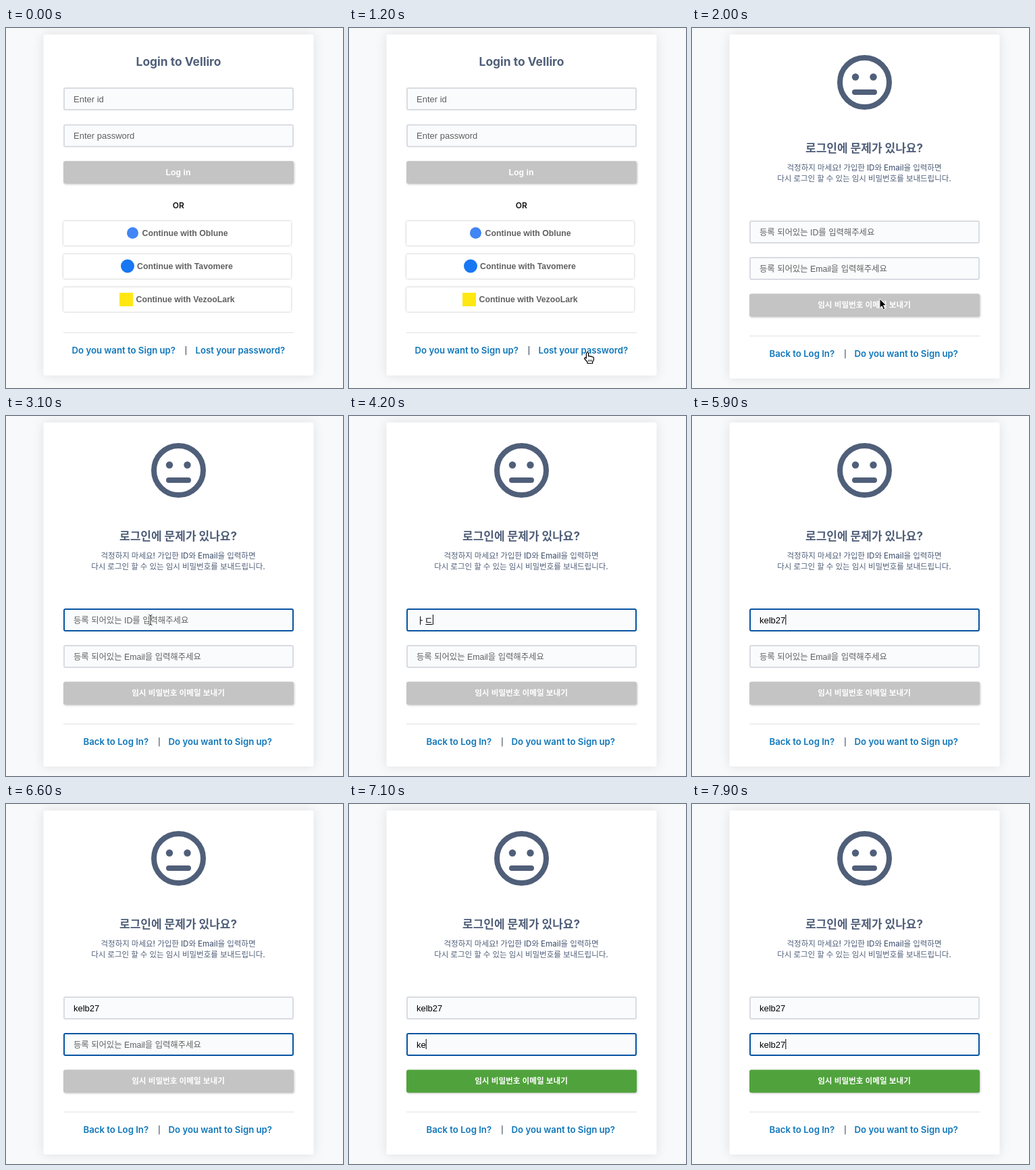
Animation of 499 by 533 pixels, one loop 8 s. Source, as an HTML page:

```html
<!DOCTYPE html>
<html lang="ko">
<head>
<meta charset="utf-8">
<title>Login</title>
<style>
  html, body { margin: 0; width: 100%; height: 100%; overflow: hidden; background: #f8f9fb; }
  svg { display: block; width: 499px; height: 533px; }
  text { font-family: "Liberation Sans", Arial, "Noto Sans CJK KR", sans-serif; white-space: pre; }
  .panel { fill: #fff; filter: drop-shadow(0 0 8px rgba(0, 0, 0, .1)); }
  .title { font: 700 17px Inter, "Noto Sans CJK KR", sans-serif; fill: #505f79; text-anchor: middle; }
  #login .title { font-size: 17.4px; }
  .note { font: 500 11.5px Inter, "Noto Sans CJK KR", sans-serif; fill: #505f79; text-anchor: middle; }
  .link { font: 600 13.2px Inter, sans-serif; fill: #0f76b9; }
  .bar { font: 500 11px Inter, sans-serif; fill: #34405a; text-anchor: middle; }
  .or { font: 600 12px Inter, sans-serif; fill: #111; text-anchor: middle; }
  .field { fill: #fafbfc; stroke: #d8dce2; stroke-width: 2; }
  .field.focus { stroke: #0754a1; }
  .hint { font-size: 13px; fill: #606060; }
  .hint.ko { font-size: 12.35px; }
  .value { font-size: 13px; fill: #000; }
  .button { fill: #c4c4c4; filter: drop-shadow(1px 1px 1.5px rgba(0, 0, 0, .22)); }
  .button.ready { fill: #50a33c; }
  .label { font-size: 12.3px; font-weight: 700; fill: #fff; text-anchor: middle; }
  .label.ko { font-size: 11.6px; }
  .social { fill: #fff; filter: drop-shadow(.7px .7px 1.5px rgba(0, 0, 0, .28)); }
  .social-label { font-size: 12.3px; font-weight: 700; fill: #616161; }
  .rule { stroke: #dcdfe3; }
  .face { fill: none; stroke: #505f79; stroke-width: 8; stroke-linecap: round; }
</style>
</head>
<body>
<svg id="stage" viewBox="0 0 499 533">
  <g id="login"></g>
  <g id="recover"></g>
  <g id="arrow">
    <path d="M0 0V13.5L3.1 10.7L5.3 15.8L7.7 14.8L5.5 9.8H9.7Z" fill="#000" stroke="#fff" stroke-linejoin="round"/>
  </g>
  <g id="hand">
    <path d="M-1.6 8.5V1.4Q-1.6 0 0 0T1.6 1.4V5.6Q3.2 4.4 4.4 6Q6 5 7 6.6Q9.4 6 9.4 8.4V11L7.6 14V16H0V14L-4.4 9Q-4.4 7 -2.6 7.6Z" fill="#fff" stroke="#000" stroke-width="1.2" stroke-linejoin="round"/>
    <path d="M1.8 10.5V13.5M4 10.5V13.5M6.2 10.5V13.5" stroke="#000" fill="none" stroke-width=".9"/>
  </g>
  <g id="beam">
    <path d="M-2.5-7.5Q0-7.5 0-5.5Q0-7.5 2.5-7.5M0-5.5V5.5M-2.5 7.5Q0 7.5 0 5.5Q0 7.5 2.5 7.5" fill="none" stroke="#222"/>
  </g>
</svg>
<script>
const LOOP = 8000, STEP = 100;
const SWITCH = 1600, FOCUS_ID = 2500, FOCUS_EMAIL = 6100;
const $ = id => document.getElementById(id);

function add(parent, tag, attrs, text = '') {
  const el = document.createElementNS('http://www.w3.org/2000/svg', tag);
  for (const key in attrs) el.setAttribute(key, attrs[key]);
  el.textContent = text;
  parent.append(el);
  return el;
}
const write = (g, cls, x, y, text) => add(g, 'text', { class: cls, x, y }, text);
const box = (g, cls, x, y, width, height, rx = 3) =>
  add(g, 'rect', { class: cls, x, y, width, height, rx });
const rule = (g, y) => add(g, 'line', { class: 'rule', x1: 85, x2: 426, y1: y, y2: y });

function field(g, y, hint, cls = 'hint') {
  return {
    y,
    frame: box(g, 'field', 86, y + 1, 339, 32, 2),
    hint: write(g, cls, 100, y + 21.5, hint),
    value: write(g, 'value', 100, y + 21.5, ''),
    line: add(g, 'path', { stroke: '#000', fill: 'none' }),
    caret: add(g, 'path', { stroke: '#000', fill: 'none' })
  };
}

function links(g, y, first, x1, barX, second, x2) {
  write(g, 'link', x1, y, first);
  write(g, 'bar', barX, y - 0.5, '|');
  write(g, 'link', x2, y, second);
}

function buildLogin(g) {
  box(g, 'panel', 55.5, 9.5, 400, 505);
  write(g, 'title', 255.5, 56, 'Login to Velliro');
  field(g, 88, 'Enter id');
  field(g, 142.5, 'Enter password');
  box(g, 'button', 85, 197, 341, 33.5);
  write(g, 'label', 255, 218, 'Log in');
  write(g, 'or', 255.2, 266.5, 'OR');
  const options = [['Oblune', 201.5], ['Tavomere', 194], ['VezooLark', 192.5]];
  options.forEach(([name, x], i) => {
    const y = 286 + i * 49;
    box(g, 'social', 85, y, 337, 36, 2);
    write(g, 'social-label', x, y + 21.5, 'Continue with ' + name);
  });
  add(g, 'circle', { cx: 187.5, cy: 303.5, r: 8.5, fill: '#4285f4' });
  add(g, 'circle', { cx: 180, cy: 352.5, r: 10, fill: '#1877f2' });
  add(g, 'rect', { x: 168, y: 392, width: 20, height: 20, fill: '#ffe812' });
  rule(g, 451);
  links(g, 482, 'Do you want to Sign up?', 97.5, 266.5, 'Lost your password?', 280.5);
}

function buildRecover(g) {
  box(g, 'panel', 55.5, 9.5, 400, 509.5);
  add(g, 'circle', { class: 'face', cx: 255.5, cy: 80.5, r: 36.5 });
  add(g, 'path', { class: 'face', d: 'M241 95H270' });
  for (const cx of [242, 268.5]) add(g, 'circle', { cx, cy: 72.5, r: 5.2, fill: '#505f79' });
  write(g, 'title', 255, 184, '로그인에 문제가 있나요?');
  write(g, 'note', 255, 211, '걱정하지 마세요! 가입한 ID와 Email을 입력하면');
  write(g, 'note', 255, 227, '다시 로그인 할 수 있는 임시 비밀번호를 보내드립니다.');
  const id = field(g, 285, '등록 되어있는 ID를 입력해주세요', 'hint ko');
  const email = field(g, 339, '등록 되어있는 Email을 입력해주세요', 'hint ko');
  const button = box(g, 'button', 85, 393.5, 341, 34);
  write(g, 'label ko', 255, 413.5, '임시 비밀번호 이메일 보내기');
  rule(g, 456);
  links(g, 487, 'Back to Log In?', 114.5, 227, 'Do you want to Sign up?', 240.5);
  return { id, email, button };
}

buildLogin($('login'));
const form = buildRecover($('recover'));

// [time, text]
const idKeys = [
  [FOCUS_ID, ''], [3900, 'ㅏ'], [4100, 'ㅏㄷ'], [4500, 'ㅏ'], [4600, ''],
  [4800, 'k'], [4900, 'ke'], [5100, 'kel'], [5200, 'kelb'], [5600, 'kelb2'], [5700, 'kelb27']
];
const emailKeys = [
  [FOCUS_EMAIL, ''], [7000, 'k'], [7100, 'ke'], [7200, 'kel'],
  [7300, 'kelb'], [7600, 'kelb2'], [7700, 'kelb27']
];
// [time, x, y]
const path = [[500, 300, 540], [1000, 353, 480.5], [1500, 353, 480.5], [2000, 278, 401], [2400, 214, 302]];
// [time, shape]
const shapes = [[0, ''], [500, 'arrow'], [900, 'hand'], [SWITCH, 'arrow'], [2300, 'beam'], [3900, '']];

const latest = (table, t) => table.filter(row => row[0] <= t).pop() || table[0];

function pointer(t) {
  const next = path.findIndex(p => p[0] > t);
  if (next < 0) return path[path.length - 1].slice(1);
  if (next === 0) return path[0].slice(1);
  const a = path[next - 1], b = path[next];
  const k = (t - a[0]) / (b[0] - a[0]), e = k * k * (3 - 2 * k);
  return [a[1] + (b[1] - a[1]) * e, a[2] + (b[2] - a[2]) * e];
}

function showField(f, keys, focused, t) {
  const [since, text] = latest(keys, t);
  f.frame.classList.toggle('focus', focused);
  f.hint.style.display = text ? 'none' : '';
  f.value.textContent = text;
  const end = 100.5 + (text ? f.value.getComputedTextLength() : 0);
  const on = focused && (t - since) % 1000 < 500;
  f.caret.setAttribute('d', on ? `M${end} ${f.y + 9}V${f.y + 24}` : '');
  const composing = /[ㄱ-ㅣ]$/.test(text);
  f.line.setAttribute('d', composing ? `M${end - 11} ${f.y + 23.5}H${end - 1}` : '');
}

function render(t) {
  $('login').style.display = t < SWITCH ? '' : 'none';
  $('recover').style.display = t < SWITCH ? 'none' : '';
  showField(form.id, idKeys, t >= FOCUS_ID && t < FOCUS_EMAIL, t);
  showField(form.email, emailKeys, t >= FOCUS_EMAIL, t);
  form.button.classList.toggle('ready', latest(emailKeys, t)[1] !== '');
  const shape = latest(shapes, t)[1], [x, y] = pointer(t);
  for (const id of ['arrow', 'hand', 'beam']) {
    $(id).style.display = id === shape ? '' : 'none';
    $(id).setAttribute('transform', `translate(${x} ${y})`);
  }
}

const start = performance.now();
function tick() {
  const t = (performance.now() - start) % LOOP;
  render(Math.floor(t / STEP) * STEP);
  requestAnimationFrame(tick);
}
tick();
</script>
</body>
</html>
```
